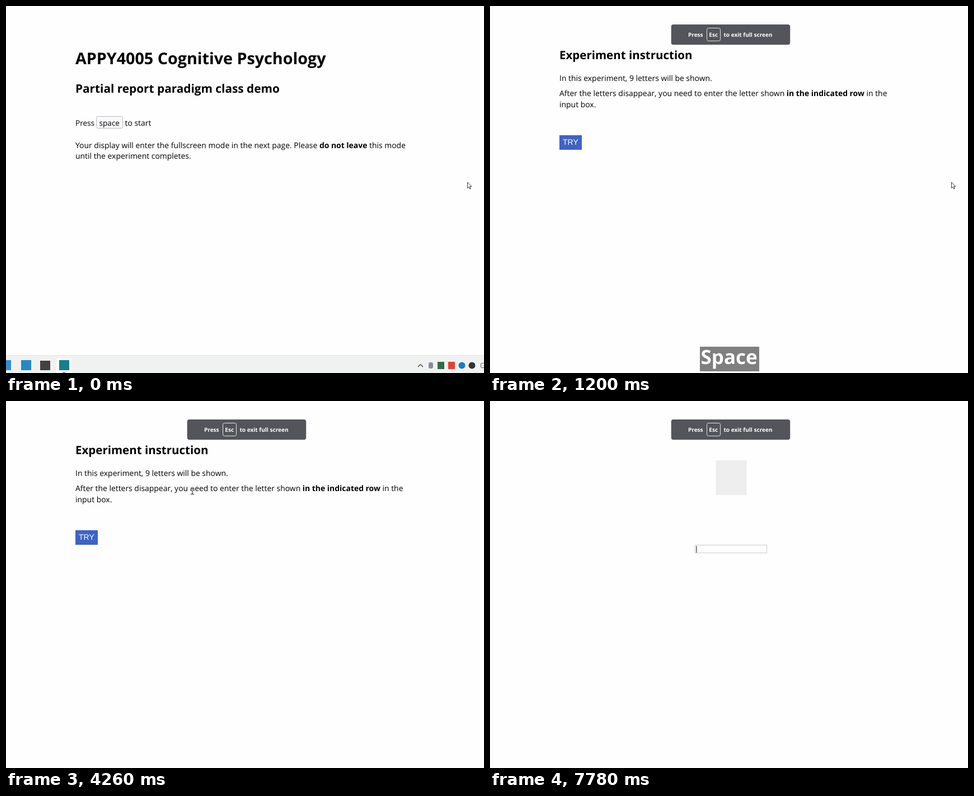
An HTML page that plays this animation: 854 by 656 pixels, repeating every 8000 ms.

```html
<!DOCTYPE html>
<html lang="en">
<head>
<meta charset="utf-8">
<title>Partial report demo</title>
<style>
html, body { margin: 0; width: 100%; height: 100%; overflow: hidden; background: #fefefe; }
svg { display: block; width: 854px; height: 656px; font: 13.93px "Open Sans", "Noto Sans", sans-serif; text-rendering: geometricPrecision; }
.bold { font-weight: 700; }
.button { font: 14px "Liberation Sans", Arial, sans-serif; }
</style>
</head>
<body>
<svg viewBox="0 0 854 656">
  <g id="welcome">
    <text class="bold" x="124" y="104" font-size="28.7">APPY4005 Cognitive Psychology</text>
    <text class="bold" x="124" y="155" font-size="20.8">Partial report paradigm class demo</text>
    <text x="124" y="214" font-size="13.6">Press</text>
    <rect x="161.5" y="197.5" width="47" height="21" rx="3" fill="#fafafa" stroke="#b8b8c0"/>
    <text x="166.5" y="214" font-size="13.6">space</text>
    <text x="212.5" y="214">to start</text>
    <text x="124" y="253.5">Your display will enter the fullscreen mode in the next page. Please <tspan class="bold">do not leave</tspan> this mode</text>
    <text x="124" y="273">until the experiment completes.</text>
  </g>

  <g id="taskbar">
    <rect y="624" width="854" height="32" fill="#f0f1f1"/>
    <path d="M0 624.5H854" stroke="#e4e5e6"/>
    <rect y="633" width="9" height="18" fill="#2f8fd0"/>
    <rect x="27" y="633" width="18" height="18" fill="#2489ca"/>
    <rect x="61" y="634" width="18" height="17" fill="#424242"/>
    <rect x="90" y="629" width="27" height="27" rx="3" fill="#fbfbfb"/>
    <rect x="95" y="633" width="18" height="18" fill="#157f8f"/>
    <path d="M101 655.5h5" stroke="#555"/>
    <path d="M736 645l4.5-4.5 4.5 4.5" fill="none" stroke="#333" stroke-width="1.2"/>
    <rect x="755" y="637" width="8" height="11" rx="3" fill="#8a8d98"/>
    <rect x="771" y="636" width="12" height="13" fill="#346a4c"/>
    <rect x="790" y="636" width="12" height="13" fill="#e5402f"/>
    <circle cx="814.5" cy="642.5" r="6" fill="#1a7bc8"/>
    <circle cx="832.5" cy="642.5" r="6" fill="#333"/>
    <rect x="848.5" y="638.5" width="12" height="8" rx="1" fill="#fff" stroke="#555"/>
    <path d="M850.5 641.5h4M850.5 644h4" stroke="#777" stroke-dasharray="1"/>
  </g>

  <g id="instruction">
    <text class="bold" x="124" y="94.5" font-size="20.5">Experiment instruction</text>
    <text x="124" y="134">In this experiment, 9 letters will be shown.</text>
    <text x="124" y="161">After the letters disappear, you need to enter the letter shown <tspan class="bold">in the indicated row</tspan> in the</text>
    <text x="124" y="180.5">input box.</text>
    <rect id="tryBox" x="124" y="231" width="40" height="26"/>
    <text class="button" x="130" y="248" fill="#fff">TRY</text>
  </g>

  <g id="trial">
    <rect id="square" x="403.5" y="106" width="55" height="62" fill="#eee"/>
    <rect x="366.5" y="257.5" width="128" height="14" fill="#fff" stroke="#ccc"/>
    <path id="caret" d="M369 259v12" stroke="#333" stroke-width="1.2"/>
  </g>

  <g id="toast" class="bold" font-size="10.05" fill="#fff">
    <rect x="323.7" y="33" width="212.5" height="36.3" rx="4" fill="#54555a"/>
    <text x="354" y="54.5">Press</text>
    <rect x="387.5" y="39.5" width="24" height="23" rx="3" fill="none" stroke="#e4e4e4"/>
    <text x="391.3" y="54.5">Esc</text>
    <text x="417.5" y="54.5">to exit full screen</text>
  </g>

  <g id="keyLabel">
    <rect x="375" y="609" width="106" height="44" fill="#7f7f7f"/>
    <text class="bold" x="376.5" y="640" font-size="35" fill="#fff">Space</text>
  </g>

  <circle id="click" cx="146" cy="249" r="9" fill="#c6c31c" fill-opacity=".75"/>
  <g id="pointer">
    <path id="arrow" d="M0 0v10.6l2.5-2.3 1.7 3.7 1.7-.8-1.7-3.5h3.4z" fill="#fff" stroke="#222" stroke-width=".9"/>
    <g id="beam" fill="none">
      <path d="M-3-6h6M0-6v12M-3 6h6" stroke="#fff" stroke-width="2.6"/>
      <path d="M-3-5.5h2.3l.7.7.7-.7h2.3M0-5v10M-3 5.5h2.3l.7-.7.7.7h2.3" stroke="#222" stroke-width="1.1"/>
    </g>
    <path id="hand" d="M-1 7V.5q1-1.4 2 0V5l5 1.2q1.3.5 1 2.1l-1 4.4H.8L-3 8.4q-.5-1.7 1-1.4L-1 8z" fill="#fff" stroke="#222" stroke-width=".9"/>
  </g>
</svg>
<script>
const LOOP = 8000, STEP = 70;
const el = id => document.getElementById(id);
const show = (id, on) => { el(id).style.display = on ? "" : "none"; };

// Pointer stops: time, x, y
const moves = [
  [0, 824.5, 315], [2590, 824.5, 315], [2660, 765, 279], [2870, 520, 196], [3080, 320, 148],
  [3220, 236, 136], [3440, 254, 135], [3510, 268, 136], [3920, 364, 146], [4190, 364, 146],
  [4260, 333, 161], [4330, 294, 164], [4750, 600, 176], [4830, 632, 188], [4930, 632, 188],
  [5000, 600, 202], [5280, 310, 256], [5490, 172, 269], [5630, 145, 248],
  [6760, 145, 248], [7040, 832, 380], [LOOP, 832, 380]
];

function pointerAt(time) {
  const last = moves.findLastIndex(m => m[0] <= time);
  const [t0, x0, y0] = moves[last], [t1, x1, y1] = moves[last + 1];
  const held = Math.floor((time - t0) / STEP) * STEP;
  const p = held / (t1 - t0);
  return [x0 + (x1 - x0) * p, y0 + (y1 - y0) * p];
}

function draw(t) {
  const [x, y] = pointerAt(t);
  const reading = t >= 930 && t < 6760;
  const onButton = reading && x > 124 && x < 164 && y > 231 && y < 257;
  const onText = reading && x < 710 && y > 120 && y < 186;

  show("welcome", t < 860);
  show("taskbar", t < 70);
  show("instruction", reading);
  show("keyLabel", t >= 860 && t < 1740);
  show("trial", t >= 6760);
  show("square", t >= 7250);
  show("caret", t < 7250 || t >= 7780);
  show("click", t >= 6620 && t < 6760);
  el("tryBox").setAttribute("fill", onButton ? "#5079ea" : "#3f63c4");

  const grow = Math.min(1, Math.floor((t - 860) / 68) / 5);
  show("toast", t >= 860);
  el("toast").setAttribute("opacity", 0.2 + 0.8 * grow);
  el("toast").setAttribute("transform", `translate(430 51) scale(${0.962 + 0.038 * grow}) translate(-430 -51)`);

  show("pointer", t < 7110);
  show("arrow", !onButton && !onText);
  show("beam", onText);
  show("hand", onButton);
  el("pointer").setAttribute("transform", `translate(${x} ${y})`);
}

function frame() {
  draw(performance.now() % LOOP);
  requestAnimationFrame(frame);
}
frame();
</script>
</body>
</html>
```
